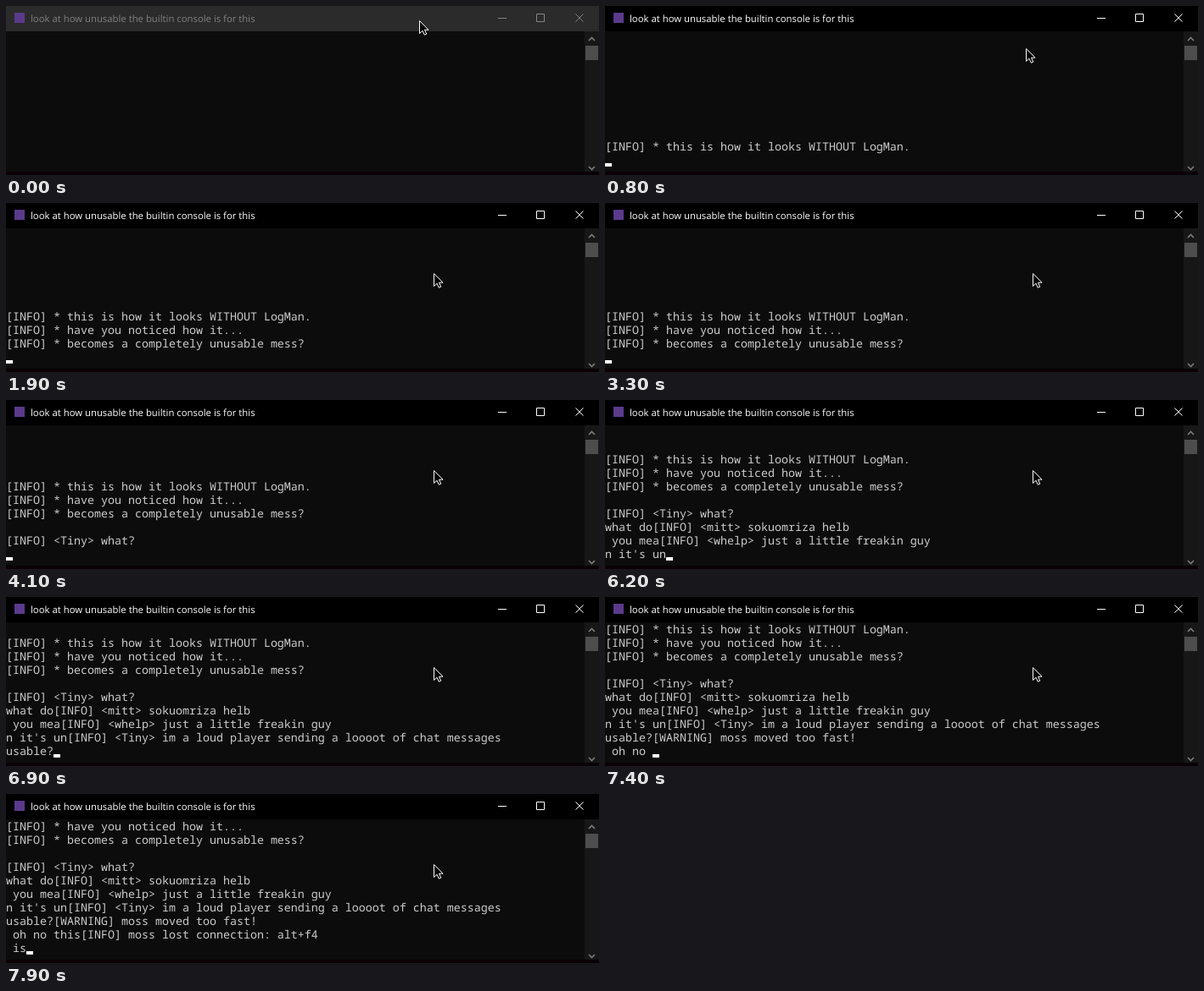
Animation of 699 by 200 pixels, one loop 8000 ms. Source, as an HTML page:

```html
<!DOCTYPE html>
<html lang="en">
<head>
<meta charset="utf-8">
<title>Console</title>
<style>
  html, body { margin: 0; width: 100%; height: 100%; overflow: hidden; background: #0c0c0c; }
  svg { display: block; }
  text { white-space: pre; text-rendering: geometricPrecision; }
  #rows { font: 13.3333px "Noto Sans Mono", monospace; fill: #ccc; }
  #title { font: 11.34px "Open Sans", sans-serif; }
</style>
</head>
<body>
<svg width="699" height="200" viewBox="0 0 699 200">
  <rect width="699" height="200" fill="#0c0c0c"/>
  <rect y="196" width="699" height="4" fill="#0a0005"/>

  <rect id="bar" width="699" height="30"/>
  <rect x="10" y="8" width="12" height="12" fill="#5b3a8c"/>
  <text id="title" x="29" y="19">look at how unusable the builtin console is for this</text>
  <path id="buttons" fill="none" d="M580 14.5h10M625.5 9.5h9v9h-9zM671.5 9.5l9 9M680.5 9.5l-9 9"/>

  <rect x="682" y="30" width="17" height="166" fill="#171717"/>
  <rect x="683" y="47" width="15" height="17" fill="#4d4d4d"/>
  <path d="M687 41l3.5-3.5 3.5 3.5M687 190l3.5 3.5 3.5-3.5" fill="none" stroke="#7c7c7c" stroke-width="1.6"/>

  <g id="rows"></g>
  <rect id="caret" y="186" width="8" height="4" fill="#fff"/>
  <path id="pointer" d="M.5 .5V15.5L4 12.2 6.3 17.2 8.7 16.2 6.5 11.2H11z" fill="#000" stroke="#fff"/>
</svg>
<script>
const LOOP = 8000, STEP = 100;
const ROWS = 10, TOP = 30, ROW_H = 16, CELL = 8, BASELINE = 13;

// Console output: [start, text, number of steps to type it]
const output = [
  [400, "[INFO] * this is how it looks WITHOUT LogMan.\n"],
  [1100, "[INFO] * have you noticed how it...\n"],
  [1900, "[INFO] * becomes a completely unusable mess?\n"],
  [3400, "\n"],
  [4100, "[INFO] <Tiny> what?\n"],
  [4200, "what do", 7],
  [4900, "[INFO] <mitt> sokuomriza helb\n"],
  [5000, " you mea", 6],
  [5600, "[INFO] <whelp> just a little freakin guy\n"],
  [5700, "n it's un", 6],
  [6300, "[INFO] <Tiny> im a loud player sending a loooot of chat messages\n"],
  [6400, "usable", 4],
  [6900, "?"],
  [7000, "[WARNING] moss moved too fast!\n"],
  [7100, " oh no this", 6],
  [7700, "[INFO] moss lost connection: alt+f4\n"],
  [7800, " is", 2],
];

const $ = id => document.getElementById(id);
const within = (t, from, to) => t >= from && t < to;

const rows = Array.from({ length: ROWS }, (_, i) => {
  const row = document.createElementNS("http://www.w3.org/2000/svg", "text");
  row.setAttribute("x", 0);
  row.setAttribute("y", TOP + i * ROW_H + BASELINE);
  return $("rows").appendChild(row);
});

function visibleText(t) {
  return output.map(([start, text, steps = 1]) => {
    if (t < start) return "";
    const done = Math.min(1, ((t - start) / STEP + 1) / steps);
    return text.slice(0, Math.round(text.length * done));
  }).join("");
}

function render(t) {
  const active = t >= 200;
  $("bar").setAttribute("fill", active ? "#000" : "#2b2b2b");
  $("title").setAttribute("fill", active ? "#fff" : "#808080");
  $("buttons").setAttribute("stroke", active ? "#fff" : "#858585");

  const lines = visibleText(t).split("\n");
  rows.forEach((row, i) => {
    row.textContent = lines[lines.length - ROWS + i] || "";
  });

  const caretOn = t >= 400 && !within(t, 1800, 1900) && !within(t, 2800, 3300);
  $("caret").setAttribute("visibility", caretOn ? "visible" : "hidden");
  $("caret").setAttribute("x", lines[lines.length - 1].length * CELL);

  const moved = t < 800 ? 0 : t < 900 ? 0.5 : 1;
  $("pointer").setAttribute("transform",
    `translate(${Math.round(487 + 17 * moved)} ${17 + 66 * moved})`);
}

const origin = performance.now();
function tick() {
  const t = (performance.now() - origin) % LOOP;
  render(Math.floor(t / STEP) * STEP);
  requestAnimationFrame(tick);
}
tick();
</script>
</body>
</html>
```
